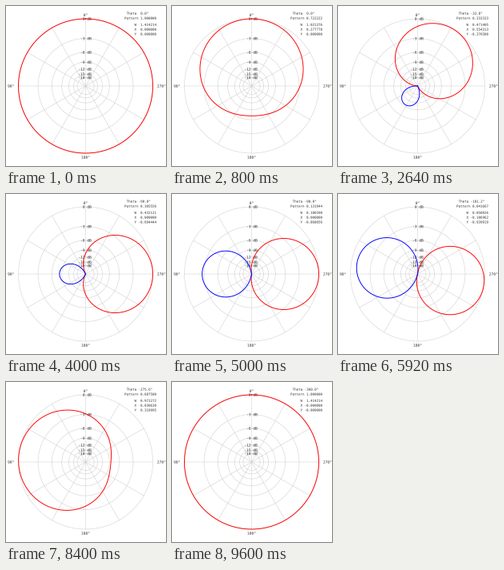
A matplotlib script for the animation above (9.64 s loop, 200 by 200 pixels).

```python
import numpy as np
import matplotlib.pyplot as plt
from matplotlib.animation import FuncAnimation
from matplotlib.patches import PathPatch
from matplotlib.textpath import TextPath
from matplotlib.transforms import Affine2D

SIZE, DPI = 200, 100
PX = 72 / DPI               # points per pixel
CX, CY, R = 99.5, 100, 84   # centre and 0 dB radius
FRAMES, INTERVAL = 241, 40
ADVANCE = 0.602             # monospaced glyph width in em
INFO, SCALE = 4.15, 4.55    # text sizes in pixels

plt.rcParams["font.family"] = "DejaVu Sans Mono"

fig = plt.figure(figsize=(SIZE / DPI, SIZE / DPI), dpi=DPI, facecolor="white")
ax = fig.add_axes([0, 0, 1, 1])
ax.set_xlim(0, SIZE)
ax.set_ylim(SIZE, 0)
ax.axis("off")

phi = np.linspace(0, 2 * np.pi, 721)


def polar(r, angle):
    """Zero degrees points up, angles run counterclockwise."""
    return CX - R * r * np.sin(angle), CY - R * r * np.cos(angle)


class Label:
    """Outline text, which keeps fractional positions at this small size."""

    def __init__(self, x, baseline, text="", size=SCALE, align=0.5):
        self.x, self.baseline = x, baseline
        self.size, self.align = size, align
        self.patch = PathPatch(TextPath((0, 0), "0", size=size), fc="#2a2a2a",
                               lw=0, zorder=2, snap=False)
        ax.add_patch(self.patch)
        self.set(text)

    def set(self, text):
        left = self.x - self.align * len(text) * ADVANCE * self.size
        path = TextPath((0, 0), text, size=self.size)
        flip = Affine2D().scale(1, -1).translate(left, self.baseline)
        self.patch.set_path(path.transformed(flip))


def draw_grid():
    style = dict(color="#cccccc", lw=0.5 * PX, zorder=1, snap=False)
    for db in range(0, -19, -3):
        gain = 10 ** (db / 20)
        ax.plot(*polar(gain, phi), **style)
        Label(106.8, CY - R * gain + 1.7, f"{db} dB", align=1)
    for deg in range(0, 360, 30):
        ax.plot(*polar(np.array([0, 1]), np.radians(deg)), **style)
    Label(CX, 12.9, "0°")
    Label(6.2, 101.7, "90°")
    Label(CX, 190.7, "180°")
    Label(194.4, 101.7, "270°")


def pose(i):
    """Steering angle in degrees and pattern (1 omni, 0 figure of eight)."""
    if i <= 48:
        return 0.0, 1 - i / 72
    if i <= 96:
        return -(i - 48) * 1.875, 1 / 3
    if i <= 144:
        return -90.0, (144 - i) / 144
    # the tiny surplus ends the turn on negative zeros
    return -90 - (i - 144) * 2.8125, (i - 144) / 96 * (1 + 1e-12)


draw_grid()
front, = ax.plot([], [], color="#ff0000", lw=0.95 * PX, zorder=3, snap=False)
back, = ax.plot([], [], color="#0000ff", lw=0.95 * PX, zorder=3, snap=False)
theta_text = Label(150.7, 10.7, size=INFO, align=0)
pattern_text = Label(188, 16.7, size=INFO, align=1)
signal_texts = [Label(188, y, size=INFO, align=1) for y in (24.8, 30.7, 36.6)]


def update(i):
    deg, p = pose(i)
    theta = np.radians(deg)
    r = p + (1 - p) * np.cos(phi - theta)
    front.set_data(*polar(np.where(r >= 0, r, np.nan), phi))
    back.set_data(*polar(np.where(r < 0, -r, np.nan), phi))

    theta_text.set(f"Theta {deg: .1f}°")
    pattern_text.set(f"Pattern {p:.6f}")
    signals = (p * np.sqrt(2), (1 - p) * np.cos(theta), (1 - p) * np.sin(theta))
    for label, name, value in zip(signal_texts, "WXY", signals):
        label.set(f"{name} {value: .6f}")
    return [front, back]


anim = FuncAnimation(fig, update, frames=FRAMES, interval=INTERVAL,
                     init_func=lambda: update(0), repeat=True,
                     repeat_delay=0, blit=False)
plt.show()
```
